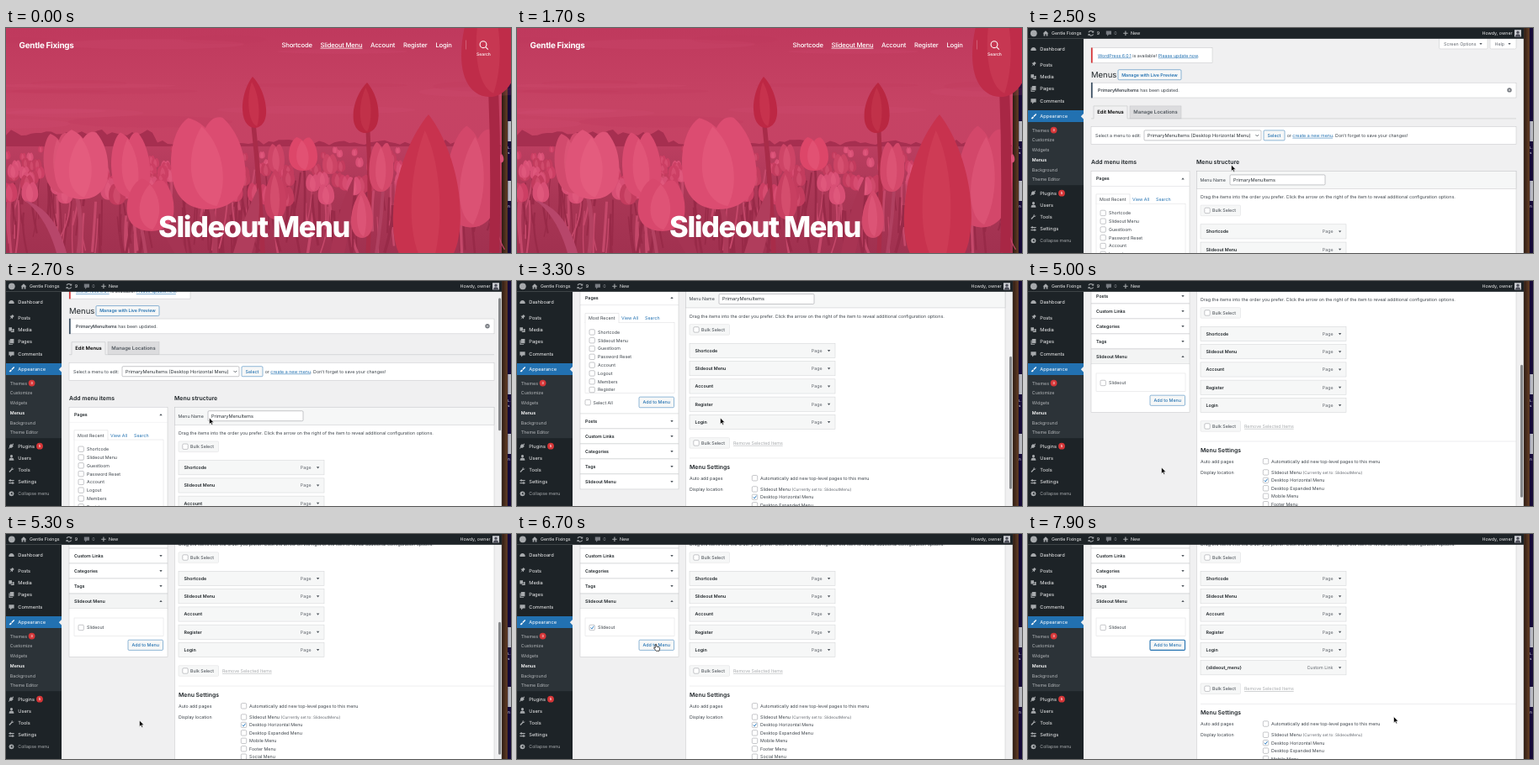
These frames come from a looping animation (600x268 px, 8 s). An HTML page:

```html
<!DOCTYPE html>
<html lang="en">
<head>
<meta charset="utf-8">
<title>Slideout Menu</title>
<style>
html, body { margin: 0; width: 600px; height: 268px; overflow: hidden; background: #1d2327; }
#stage { display: block; }
text { font-family: Inter, Roboto, sans-serif; text-rendering: geometricPrecision; white-space: pre; }
.u { text-decoration: underline; }
.link { fill: #2271b1; text-decoration: underline; }
</style>
</head>
<body>
<svg id="stage" width="600" height="268" viewBox="0 0 600 268"></svg>
<script>
const LOOP = 8000, PAGE_SWITCH = 1800;
const OPEN_AT = 4600, CHECK_AT = 6150, ADD_CLICK = 6900, ADDED_AT = 7400;
const INK = '#3c434a', DARK = '#1d2327', BLUE = '#2271b1', LINE = '#c3c4c7', PALE = '#f6f7f7', GREY = '#a7aaad';
const PAGES_H = 129, SLIDE_H = 58, ROW = 21.25;

// y is the vertical middle of the text
const text = (x, y, str, size = 5.3, fill = INK, weight = 400, extra = '') =>
  `<text x="${x}" y="${y + size * 0.36}" font-size="${size}" fill="${fill}" font-weight="${weight}" ${extra}>${str}</text>`;
const bold = (x, y, str, size = 5.3, fill = DARK) => text(x, y, str, size, fill, 600);
const rect = (x, y, w, h, fill, stroke = 'none', r = 0, extra = '') =>
  `<rect x="${x}" y="${y}" width="${w}" height="${h}" fill="${fill}" stroke="${stroke}" stroke-width=".5" rx="${r}" ${extra}/>`;
const path = (d, fill, stroke = 'none', width = 1, extra = '') =>
  `<path d="${d}" fill="${fill}" stroke="${stroke}" stroke-width="${width}" ${extra}/>`;
const circle = (x, y, r, fill, extra = '') => `<circle cx="${x}" cy="${y}" r="${r}" fill="${fill}" ${extra}/>`;
const tri = (x, y, up, id = '') => {
  const s = up ? -1 : 1;
  return path(`M${x - 1.7} ${y - s}h3.4l-1.7 ${2.2 * s}z`, '#50575e', 'none', 1, id && `id="${id}"`);
};
const box = (x, y) => rect(x, y - 3.2, 6.4, 6.4, '#fff', '#8c8f94', 1.3);
const tick = (x, y, extra = '') => path(`M${x + 1.5} ${y}l1.4 1.6 2.3-3.4`, 'none', '#3582c4', 1, extra);
const button = (x, y, w, h, label, extra = '') =>
  rect(x, y, w, h, PALE, BLUE, 1.2, extra) +
  text(x + w / 2, y + h / 2, label, 5.3, BLUE, 500, 'text-anchor="middle"');

function random(seed) {
  return () => (seed = (seed * 16807) % 2147483647) / 2147483647;
}

// ---- front page -------------------------------------------------------
const CUP = 'M-.5 .55C-.5 .25-.35 .05-.22 0C-.12 .03-.05 .07 0 .12C.08 .02 .15 0 .24 .02C.4 .15 .5 .35 .5 .6C.5 .85 .3 1 0 1C-.3 1-.5 .85-.5 .55Z';
const BUD = 'M0 0C.2 .1 .5 .35 .5 .65C.5 .9 .25 1 0 1C-.25 1-.5 .9-.5 .65C-.5 .35-.2 .1 0 0Z';
const PETAL = 'M-.05 .1C.2 .3 .28 .7 .08 .97C-.3 .9-.32 .4-.05 .1Z';
function tulip(shape, x, top, w, h, fill, tilt = 0, sheen = '#f0708e') {
  return `<g transform="translate(${x} ${top}) rotate(${tilt}) scale(${w} ${h})">` +
    path(shape, fill) + path(PETAL, sheen, 'none', 1, 'opacity=".28"') + '</g>';
}
const stem = (d, color, width) => path(d, 'none', color, width);

function meadow() {
  const rnd = random(77);
  let s = rect(0, 0, 589, 268, 'url(#sky)');
  for (let i = 0; i < 16; i++) {
    s += `<ellipse cx="${rnd() * 560}" cy="${rnd() * 115}" rx="${50 + rnd() * 90}" ry="${2 + rnd() * 5}" fill="${i % 2 ? '#d05575' : '#b83458'}" opacity=".16"/>`;
  }
  let trees = 'M0 142';
  for (let x = 0; x <= 590; x += 6) {
    trees += `L${x} ${(x < 180 ? 121 : 133) + rnd() * 7}`;
  }
  s += path(trees + 'V150H0Z', '#a62f50') + rect(0, 141, 589, 127, 'url(#field)');
  for (let i = 0; i < 170; i++) {
    const x = rnd() * 589, y = 165 + rnd() * 70;
    s += stem(`M${x} ${y}q${rnd() * 8 - 4} 25 ${rnd() * 22 - 11} ${35 + rnd() * 40}`,
      i % 3 ? '#982a48' : '#c4486a', 1 + rnd() * 2.4);
  }
  for (let i = 0; i < 150; i++) {
    const near = i / 150, w = 6 + near * 14;
    s += tulip(CUP, rnd() * 589, 138 + near * 45 + rnd() * 8, w, w * 1.25, ['#cc3f64', '#d84f75', '#c33c5e'][i % 3]);
  }
  s += stem('M83 195Q92 230 86 268', '#b44262', 5) + stem('M153 195Q160 230 166 268', '#b44262', 4) +
    stem('M243 210Q250 240 248 268', '#ac3a59', 6) + stem('M294 115Q302 190 305 268', '#a82c49', 5.5) +
    stem('M430 122Q434 190 430 268', '#aa2c48', 5) + stem('M448 192Q446 230 440 268', '#b04161', 4) +
    path('M60 268Q48 225 22 205Q58 215 72 268Z', '#b7466a') +
    path('M200 268Q180 235 172 205Q204 228 214 268Z', '#a53453') +
    path('M270 268Q286 215 300 190Q304 230 292 268Z', '#b03d5c') +
    path('M385 268Q394 215 414 175Q412 225 402 268Z', '#a83453');
  s += tulip(CUP, 62, 125, 42, 72, '#d24a6d', -6) + tulip(CUP, 92, 122, 64, 82, '#df5478', 3) +
    tulip(CUP, 146, 124, 46, 78, '#da4b70', -3) + tulip(CUP, 236, 106, 88, 110, '#dc4c71', -4) +
    tulip(CUP, 174, 180, 56, 62, '#d8486d', 4) + tulip(CUP, 353, 130, 34, 40, '#dd4669') +
    tulip(CUP, 321, 138, 20, 34, '#cd4466') + tulip(BUD, 320, 168, 26, 60, '#c83f61') +
    tulip(CUP, 447, 136, 29, 59, '#d4486a', 2) + tulip(BUD, 423, 193, 26, 57, '#d44a6c') +
    tulip(CUP, 385, 150, 18, 24, '#cc4465') + tulip(CUP, 562, 118, 66, 120, '#d3476a', 6);
  s += tulip(BUD, 293, 58, 28, 61, '#bd2744', -3, '#dd5064') + tulip(BUD, 429, 65, 30, 60, '#b92741', 2, '#d44c5e') +
    tulip(BUD, 502, 103, 80, 190, '#c8324e', 1, '#dc5368') +
    stem('M579 70Q583 170 580 268', '#a82745', 12) +
    tulip(BUD, 574, -60, 66, 142, '#bf2c49', 0, '#d9556a');
  return s;
}

function frontPage() {
  const nav = (x, label, cls = '') =>
    text(x, 20, label, 7.65, '#fff', 500, `letter-spacing="-.2" class="${cls}"`);
  return meadow() +
    text(15.5, 20.3, 'Gentle Fixings', 9.9, '#fff', 700, 'letter-spacing="-.27"') +
    nav(327.5, 'Shortcode') + nav(373.5, 'Slideout Menu', 'u') + nav(433, 'Account') +
    nav(472, 'Register') + nav(510.5, 'Login') + rect(546.2, 14.5, 0.5, 11, '#e08aa0') +
    circle(567, 19.7, 3.9, 'none', 'stroke="#fff" stroke-width="1.1"') + path('M569.8 22.6l3 3', 'none', '#fff', 1.1) +
    text(567.5, 31.3, 'Search', 5, '#fff', 500, 'text-anchor="middle"') +
    text(294.5, 236.3, 'Slideout Menu', 34.4, '#fff', 800, 'text-anchor="middle" letter-spacing="-1.43"');
}

// ---- menu editor ------------------------------------------------------
function topBar() {
  const light = (x, s, anchor = 'start') => text(x, 6.3, s, 5.3, '#f0f0f1', 400, `text-anchor="${anchor}"`);
  return rect(0, 0, 589, 12.8, DARK) + circle(6.8, 6.3, 3.9, GREY) +
    path('M17.6 6.6L21 3.3l3.4 3.3h-1V9.4h-1.7V7.2h-1.4v2.2h-1.7V6.6z', GREY) + light(28, 'Gentle Fixings') +
    path('M72 5.2a3 3 0 0 1 5-.6M77.6 7.4a3 3 0 0 1-5 .6', 'none', GREY, 1.1) +
    path('M78.2 3v2.6h-2.6zM71.5 9.6V7h2.6z', GREY) + light(81.7, '9') +
    path('M92.8 3.4h6.2v4.4h-3l-2 2v-2h-1.2z', '#787c82') + text(102.3, 6.3, '0', 5.3, '#8c8f94') +
    path('M113.2 6.3h5.4M115.9 3.6V9', 'none', GREY, 1.1) + light(122, 'New') +
    light(575.5, 'Howdy, owner', 'end') + rect(578, 2.2, 8, 8.2, '#c9cbd0') +
    circle(582, 5.2, 1.6, '#4b4d58') + path('M579 10.4q0-3.2 3-3.2t3 3.2z', '#4b4d58');
}

function sidebar() {
  const icons = {
    Dashboard: 'M3.4 27a3.2 3.2 0 1 1 6.2 0zM6.3 26l1.5-2.8',
    Posts: 'M4 46l2-2.6-1.6-1.6 1.8-.2 1.6-1.6 1.9 2-1.6 1.5-.2 1.8-1.5-1.4z',
    Media: 'M3.4 55.3h3.6v4.3H3.4zM7.6 57h2v4H5.8v-1h1.8z',
    Pages: 'M4.8 69h4.6v5.2H4.8zM3.5 70.4h1v4.8h3.6v.8H3.5z',
    Comments: 'M3.4 84.3h6.2v4.2H7l-2 2v-2H3.4z',
    Appearance: 'M3.6 107.5l2.2-2 1.2 1.2-2 1.8zM6.2 105l3-3 1 1-3 3z',
    Plugins: 'M4 196l2-2 1 1 1.4-1.4.8.8-1.4 1.4 1 1-2 2H4.5l-1 1-.6-.6 1-1z',
    Users: 'M6.5 207a1.6 1.6 0 1 1 0 3.2 1.6 1.6 0 0 1 0-3.2zM3.6 213.8q0-3.2 2.9-3.2t2.9 3.2z',
    Tools: 'M3.4 227l3-3q-.4-2 1.8-2.2l-1 1.2.9 1 1.3-.9q0 2-2.2 1.9l-2.8 2.9z',
    Settings: 'M3.4 237h6.2v1.2H3.4zM3.4 240h6.2v1.2H3.4zM4.6 236h1v3h-1zM7.4 239h1v3h-1z'
  };
  const rows = { Dashboard: 25, Posts: 43.6, Media: 58, Pages: 72.2, Comments: 86.8, Appearance: 105.3, Plugins: 196.7, Users: 211, Tools: 225.2, Settings: 239.4 };
  const sub = { Themes: 121.7, Customize: 133.4, Widgets: 145, Background: 168.7, 'Theme Editor': 180.4 };
  const badge = (x, y, n) => circle(x, y, 3.9, '#d63638') + text(x, y, n, 4.2, '#fff', 500, 'text-anchor="middle"');
  let s = rect(0, 12.8, 66, 256, DARK) + rect(0, 98, 66, 14.2, BLUE) + rect(0, 112.2, 66, 75, '#2c3338') +
    path('M66 102l-3.2 3.2 3.2 3.2z', '#f0f0f1');
  for (const name in rows) {
    const on = name === 'Appearance';
    s += path(icons[name], on ? '#fff' : GREY) + text(14.3, rows[name], name, 5.7, on ? '#fff' : '#f0f0f1');
  }
  for (const name in sub) s += text(4.8, sub[name], name, 5.3, '#b5b8bb');
  return s + bold(4.8, 157.2, 'Menus', 5.3, '#fff') + badge(30.6, 121.6, '3') + badge(40, 196.7, '5') +
    circle(6.5, 253.3, 2.9, GREY) + path('M7.5 251.6l-2 1.7 2 1.7z', DARK) + text(14.3, 253.3, 'Collapse menu', 5.3, GREY);
}

function pageHead() {
  const cap = (x, w, label) => path(`M${x} 12.8v10.7q0 1.5 1.5 1.5h${w - 3}q1.5 0 1.5-1.5V12.8`, '#fff', LINE, 0.5) +
    text(x + 5.5, 19, label, 5.3, '#646970') + tri(x + w - 8, 19, false);
  return cap(488.5, 57.5, 'Screen Options') + cap(549, 31, 'Help') +
    rect(75, 23.8, 144, 17.6, '#fff', LINE) + rect(75, 23.6, 1.7, 18, '#d63638') +
    text(83, 32.8, '<tspan class="link">WordPress 6.0.1</tspan> is available! <tspan class="link">Please update now</tspan>.') +
    text(75, 55.8, 'Menus', 9.5, DARK) + rect(107, 49.8, 75, 12, PALE, BLUE, 1.2) +
    text(144.5, 55.8, 'Manage with Live Preview', 5.3, BLUE, 600, 'text-anchor="middle"') +
    rect(75, 65.3, 505, 17.8, '#fff', LINE) + rect(75, 65, 1.7, 18.4, '#3c5064') +
    text(83, 74.2, '<tspan font-weight="600">PrimaryMenuItems</tspan> has been updated.') +
    circle(572, 74, 2.7, '#787c82') + path('M571 73l2 2M573 73l-2 2', 'none', '#fff', 0.6) +
    rect(121, 93, 61, 15, '#dcdcde', LINE) + text(151.5, 100.4, 'Manage Locations', 5.9, '#50575e', 600, 'text-anchor="middle"') +
    path('M75 108H78V93h40v15H580', 'none', LINE, 0.6) + text(98, 100.4, 'Edit Menus', 5.9, '#000', 600, 'text-anchor="middle"') +
    rect(75, 117.5, 505, 21, '#fff', LINE) + text(80, 128, 'Select a menu to edit:') +
    rect(138, 122, 139, 12, '#fff', '#8c8f94', 1.2) + text(142, 128, 'PrimaryMenuItems (Desktop Horizontal Menu)', 5.6, '#2c3338') +
    path('M270.5 127.2l1.8 1.8 1.8-1.8', 'none', '#50575e', 0.9) + button(280, 122, 25, 12, 'Select') +
    text(307.7, 128, 'or <tspan class="link">create a new menu</tspan>. Don’t forget to save your changes!') +
    bold(75, 160, 'Add menu items', 6.9) + bold(200, 160, 'Menu structure', 6.9);
}

function leftPanel() {
  const header = (y, label, arrowId = '', extra = '') =>
    rect(75, y - 9, 117, 18, '#fff', LINE, 0, extra) + bold(81, y, label) + tri(184, y, false, arrowId);
  const names = ['Shortcode', 'Slideout Menu', 'Guestloom', 'Password Reset', 'Account', 'Logout', 'Members', 'Register'];
  const list = names.map((n, i) => box(86, 220.5 + i * 9.8) + text(96, 220.5 + i * 9.8, n)).join('');
  const pages = rect(75, 188, 117, PAGES_H + 1, '#fff', LINE) + rect(81, 209.3, 106, 83.7, '#fff', '#dcdcde') +
    path('M81 209.6V198h40v11.6', '#fff', '#dcdcde', 0.6) + text(85, 204, 'Most Recent') +
    text(124, 204, 'View All', 5.3, BLUE) + text(152, 204, 'Search', 5.3, BLUE) + list +
    box(81, 304.2) + text(90.5, 304.2, 'Select All') + button(145, 297.7, 41.5, 12.6, 'Add to Menu');
  const slide = rect(75, 407, 117, SLIDE_H, '#fff', LINE) + rect(81, 418.5, 106, 21.5, '#fff', '#dcdcde') +
    box(86, 430) + tick(86, 430, 'id="slideTick"') + text(96, 430, 'Slideout') +
    button(145, 444.7, 41.5, 12.2, 'Add to Menu', 'id="addButton"');
  const fold = (id, y, h, body) =>
    `<svg id="${id}" x="74" y="${y}" width="119" height="${h}"><g transform="translate(-74 ${-y})">${body}</g></svg>`;
  return rect(75, 170.5, 117, 18, '#fff', LINE) + bold(81, 179.5, 'Pages') +
    tri(184, 179.5, true, 'pagesUp') + tri(184, 179.5, false, 'pagesDown') +
    fold('pagesBody', 188.5, PAGES_H, pages) +
    `<g id="lower">${header(326.5, 'Posts')}${header(344.5, 'Custom Links')}${header(362.5, 'Categories')}${header(380.5, 'Tags')}` +
    header(398.5, 'Slideout Menu', 'slideDown', 'id="slideHead"') + tri(184, 398.5, true, 'slideUp') +
    fold('slideBody', 407.2, SLIDE_H + 0.5, slide) + '</g>';
}

function rightPanel() {
  const bulk = y => rect(205, y - 6.3, 47.5, 12.6, PALE, '#dcdcde', 1) + box(209.8, y) + text(219, y, 'Bulk Select');
  const item = (i, name, kind = 'Page') => {
    const y = 242.5 + i * ROW;
    return rect(205, y - 8.6, 173, 17.2, PALE, '#d0d1d4') + bold(211.5, y, name) +
      text(362.5, y, kind, 5.3, '#646970', 400, 'text-anchor="end"') + tri(370.6, y, false);
  };
  const spots = ['Slideout Menu <tspan font-size="4.7" fill="#646970">(Currently set to: SlideoutMenu)</tspan>',
    'Desktop Horizontal Menu', 'Desktop Expanded Menu', 'Mobile Menu', 'Footer Menu', 'Social Menu'];
  return rect(200.5, 170.5, 379.5, 400, '#fff', LINE) + rect(200.5, 170.5, 379.5, 21, PALE, LINE) +
    text(204.5, 181, 'Menu Name') + rect(240, 175, 113, 12, '#fff', '#8c8f94', 1.2) + text(244, 181, 'PrimaryMenuItems', 5.6, '#2c3338') +
    text(205, 201.7, 'Drag the items into the order you prefer. Click the arrow on the right of the item to reveal additional configuration options.') +
    bulk(217.5) + ['Shortcode', 'Slideout Menu', 'Account', 'Register', 'Login'].map((n, i) => item(i, n)).join('') +
    `<g id="newItem">${item(5, '{slideout_menu}', 'Custom Link')}</g><g id="below">` + bulk(352.5) +
    text(257, 352.5, 'Remove Selected Items', 5.3, '#a7aaad', 400, 'class="u"') + rect(205, 370.3, 375, 0.5, '#dcdcde') +
    bold(205, 381.2, 'Menu Settings', 6.9) + text(205, 394.3, 'Auto add pages') + box(279.3, 394.3) +
    text(289, 394.3, 'Automatically add new top-level pages to this menu') + text(205, 407.5, 'Display location') +
    spots.map((n, i) => box(279.3, 407.5 + i * 9.45) + text(289, 407.5 + i * 9.45, n)).join('') + tick(279.3, 417) + '</g>';
}

function desktop() {
  const note = (y, s) => text(596.3, y, s, 4, '#fff');
  return rect(589, 0, 11, 268, 'url(#wood)') + rect(596, 0, 4, 268, '#150a38') +
    rect(596.3, 111, 4, 24, '#b9bac2') + rect(596.3, 182, 4, 24, '#b9bac2') + note(143, 'L..') + note(149, 's') + note(213, 'fi');
}

const stage = document.getElementById('stage');
const gradient = (id, dir, ...colors) => `<linearGradient id="${id}" ${dir}>` +
  colors.map((c, i) => `<stop offset="${i / (colors.length - 1)}" stop-color="${c}"/>`).join('') + '</linearGradient>';
const DOWN = 'x1="0" y1="0" x2="0" y2="1"', ACROSS = 'x1="0" y1="0" x2="1" y2="0"';
stage.innerHTML = '<defs>' + gradient('sky', DOWN, '#bf395d', '#c64364', '#c54164', '#c03b5e') +
  gradient('field', DOWN, '#bb3e60', '#a93655', '#a13150') + gradient('wood', ACROSS, '#2c1a12', '#5a3823', '#38200f') + '</defs>' +
  desktop() + `<g id="front">${frontPage()}</g><g id="editor">` + rect(0, 0, 589, 268, '#f0f0f1') +
  `<g id="page">${pageHead()}${leftPanel()}${rightPanel()}</g>` +
  rect(585, 0, 3, 158, '#86888b', 'none', 1.5, 'id="thumb"') + rect(588.6, 0, 0.5, 268, '#9a9a9a') +
  sidebar() + topBar() +
  '<g id="arrow">' + path('M0 0V7.4L1.8 5.9 3 8.5 4.2 8 3.1 5.4H5.4Z', '#000', '#fff', 0.6) + '</g>' +
  '<g id="hand">' + path('M-.8 .6Q0-.4 .8 .6V3l3.2 .9q.7.3.6 1.4L4 8.3H.3L-2.3 5q-.3-1 .8-.8l.7.7z', '#fff', '#000', 0.7) + '</g></g>';

// ---- motion -----------------------------------------------------------
const el = id => document.getElementById(id);
const show = (id, on) => el(id).setAttribute('visibility', on ? 'inherit' : 'hidden');
const move = (id, x, y) => el(id).setAttribute('transform', `translate(${x} ${y})`);
const smooth = u => u * u * (3 - 2 * u);
const within = (t, a, b) => t >= a && t < b;

function track(keys, t, ease = u => u) {
  if (t <= keys[0][0]) return keys[0].slice(1);
  for (let i = 1; i < keys.length; i++) {
    const [a, ...from] = keys[i - 1], [b, ...to] = keys[i];
    if (t <= b) return from.map((v, k) => v + (to[k] - v) * ease((t - a) / (b - a)));
  }
  return keys[keys.length - 1].slice(1);
}

const SCROLL = [[2500, 0], [2700, 20], [3000, 100], [3300, 159.5], [3550, 174.5], [4900, 174.5], [5200, 189.5]];
const POINTER = [[3600, 241.5, 163], [4200, 158.5, 222], [5350, 158.5, 222], [6000, 89, 111],
  [6250, 89, 111], [6700, 165, 131], [7100, 165, 131], [7850, 434.5, 217.5]];

function draw(t) {
  const editing = t >= PAGE_SWITCH;
  show('front', !editing);
  el('editor').setAttribute('display', editing ? 'inline' : 'none');
  const [scroll] = track(SCROLL, t);
  move('page', 0, -scroll);
  show('thumb', within(t, 2550, 4000) || within(t, 4900, 5800));
  el('thumb').setAttribute('y', 10 + scroll * 0.5);

  const open = t >= OPEN_AT;
  const [fold] = track([[OPEN_AT, 0], [OPEN_AT + 200, 1]], t, smooth);
  el('pagesBody').setAttribute('height', PAGES_H * (1 - fold));
  el('slideBody').setAttribute('height', (SLIDE_H + 0.5) * fold);
  move('lower', 0, -PAGES_H * fold);
  show('pagesUp', !open);
  show('pagesDown', open);
  show('slideDown', !open);
  show('slideUp', open);
  el('slideHead').setAttribute('fill', t >= 4100 ? '#f3f4f4' : '#fff');

  const added = t >= ADDED_AT;
  show('slideTick', within(t, CHECK_AT, ADDED_AT));
  el('addButton').setAttribute('stroke-width', t >= ADD_CLICK ? 1.1 : 0.5);
  show('newItem', added);
  move('below', 0, added ? ROW : 0);

  const [x, y] = track(POINTER, t, smooth);
  const hand = within(t, 4080, 4750) || within(t, 6600, 7180);
  show('arrow', !hand);
  show('hand', hand);
  move('arrow', x, y);
  move('hand', x, y);
}

const start = performance.now();
function play() {
  draw((performance.now() - start) % LOOP);
  requestAnimationFrame(play);
}
play();
</script>
</body>
</html>
```
